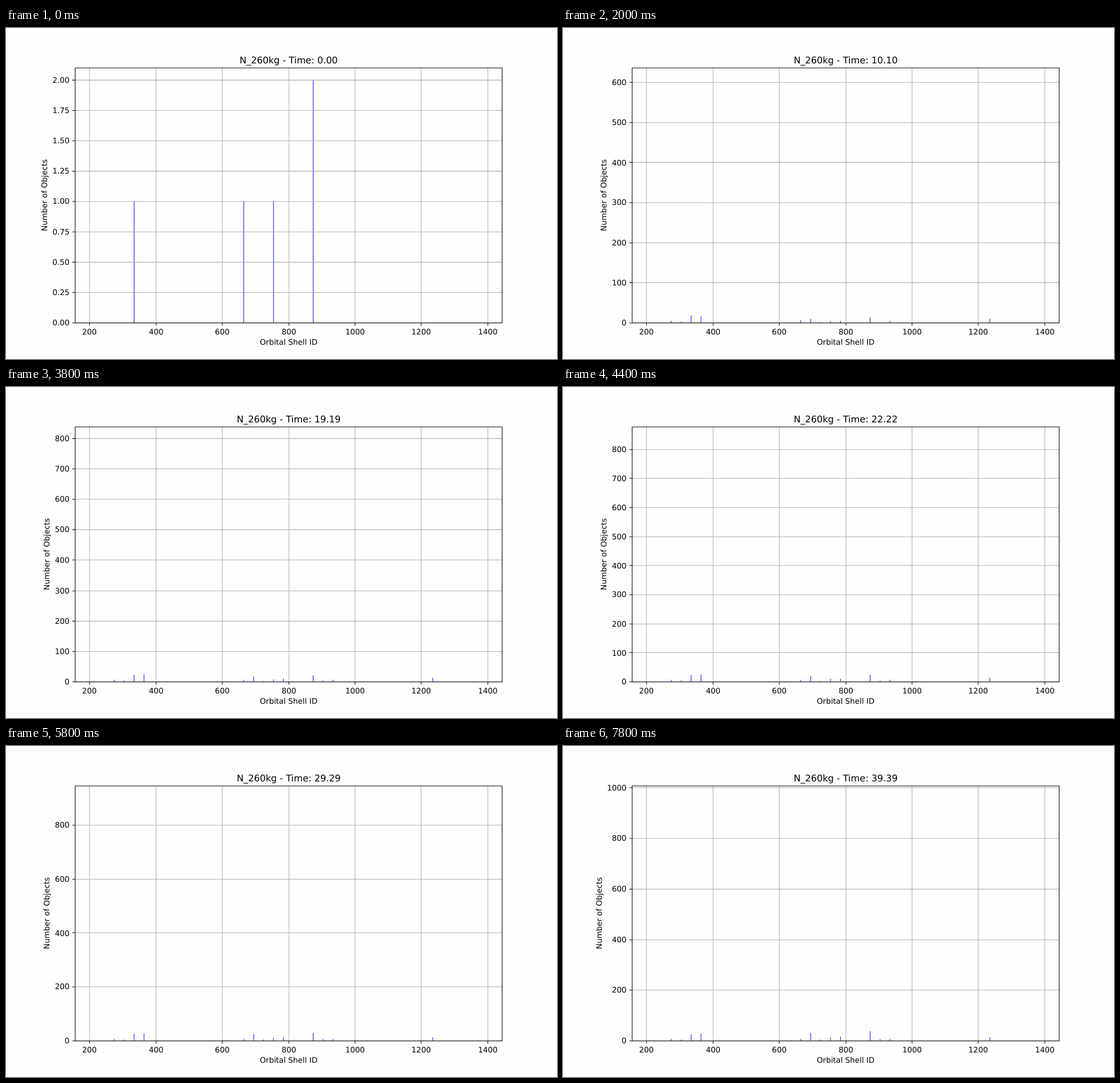
These frames come from a looping animation (966x580 px, 8 s). An HTML page:

```html
<!DOCTYPE html>
<html lang="en">
<head>
<meta charset="utf-8">
<title>Objects per orbital shell</title>
<style>
  html, body { margin: 0; width: 100%; height: 100%; overflow: hidden; background: #fefefe; }
  svg {
    display: block; width: 966px; height: 580px;
    font: 13.89px "DejaVu Sans", sans-serif; text-rendering: geometricPrecision;
  }
  path { fill: none; stroke: #000; stroke-width: 1.11; }
  #bars { fill: #00f; stroke: none; }
  .grid { stroke: #b0b0b0; }
  #title { font-size: 16.67px; }
  .mid { text-anchor: middle; }
  #yLabels { text-anchor: end; }
</style>
</head>
<body>
<svg viewBox="0 0 1000 600" preserveAspectRatio="none">
  <path id="bars"/>
  <path id="xGrid" class="grid"/>
  <path id="yGrid" class="grid"/>
  <path id="xTicks"/>
  <path id="yTicks"/>
  <path d="M125.5 72.5H900.5V534.5H125.5Z"/>
  <g id="xLabels" class="mid"></g>
  <g id="yLabels"></g>
  <text id="title" class="mid" x="513" y="64"></text>
  <text class="mid" x="513" y="574">Orbital Shell ID</text>
  <text id="yName" class="mid">Number of Objects</text>
</svg>
<script>
const FRAME_MS = 200, FRAMES = 40, LAST = FRAMES - 1;
const LEFT = 125, WIDTH = 775, BOTTOM = 534, HEIGHT = 462;
const X_MIN = 156.5, X_SPAN = 1287;
const DIGIT = 8.84;

// Each shell climbs from its initial count to its final one; pace is in frames
const INITIAL = { 335: 1, 665: 1, 755: 1, 875: 2 };
const GROWTH = [
  { pace: 8.5, final: { 305: 4.4, 335: 24.5, 665: 6.6, 935: 6.6, 1235: 13.6 } },
  { pace: 15, final: { 275: 6.8, 365: 29.3 } },
  { pace: 100, final: { 695: 31.6, 725: 4.5, 755: 13.5, 785: 15.8, 875: 36, 905: 6.8 } }
];

const el = id => document.getElementById(id);
const setPath = (id, parts) => el(id).setAttribute("d", parts.join(""));
const label = (x, y, text) => `<text x="${x}" y="${y}">${text}</text>`;
const snap = v => Math.floor(v + 0.5) + 0.5;
const toX = shell => LEFT + (shell - X_MIN) / X_SPAN * WIDTH;
const saturate = (n, pace) => 1 - Math.exp(-n / pace);

// Hyperbolic saturation with a slower start
const axisMax = n =>
  Math.max(2.1, n / (0.00736 + 0.000804 * n + 0.00298 * Math.exp(-n / 4.5)));

// Smallest round step giving at most nine intervals
function tickStep(max) {
  const raw = max / 9;
  const power = 10 ** Math.floor(Math.log10(raw));
  return [1, 2, 2.5, 5, 10].find(s => s * power >= raw) * power;
}

function bars(n, toY) {
  return GROWTH.flatMap(({ pace, final }) => {
    const progress = saturate(n, pace) / saturate(LAST, pace);
    return Object.entries(final).map(([shell, end]) => {
      const begin = INITIAL[shell] || 0;
      const top = Math.round(toY(begin + (end - begin) * progress));
      return `M${Math.floor(toX(shell))} ${top}h1V${BOTTOM}h-1Z`;
    });
  });
}

function drawXAxis() {
  const shells = Array.from({ length: 7 }, (_, i) => 200 * (i + 1));
  setPath("xGrid", shells.map(s => `M${snap(toX(s))} 72.5V534.5`));
  setPath("xTicks", shells.map(s => `M${snap(toX(s))} 534.5v5`));
  el("xLabels").innerHTML = shells.map(s => label(snap(toX(s)), 555, s)).join("");
}

function draw(n) {
  const max = axisMax(n);
  const toY = value => BOTTOM - value / max * HEIGHT;
  const step = tickStep(max);
  const decimals = step < 1 ? 2 : 0;
  const ticks = [];
  for (let v = 0; v <= max; v += step) ticks.push(v);

  setPath("bars", bars(n, toY));
  setPath("yGrid", ticks.map(v => `M125.5 ${snap(toY(v))}H900.5`));
  setPath("yTicks", ticks.map(v => `M120.5 ${snap(toY(v))}h5`));
  el("yLabels").innerHTML =
    ticks.map(v => label(115.3, Math.round(toY(v) + 5.2), v.toFixed(decimals))).join("");

  const widest = ticks[ticks.length - 1].toFixed(decimals);
  const labelWidth = DIGIT * (decimals ? 3.5 : widest.length);
  el("yName").setAttribute("transform", `translate(${105.5 - labelWidth} 303) rotate(-90)`);
  el("title").textContent = `N_260kg - Time: ${(n * 100 / 99).toFixed(2)}`;
}

let shown = -1;
const start = performance.now();
function tick() {
  const n = Math.floor((performance.now() - start) / FRAME_MS) % FRAMES;
  if (n !== shown) draw(shown = n);
  requestAnimationFrame(tick);
}
drawXAxis();
tick();
</script>
</body>
</html>
```
